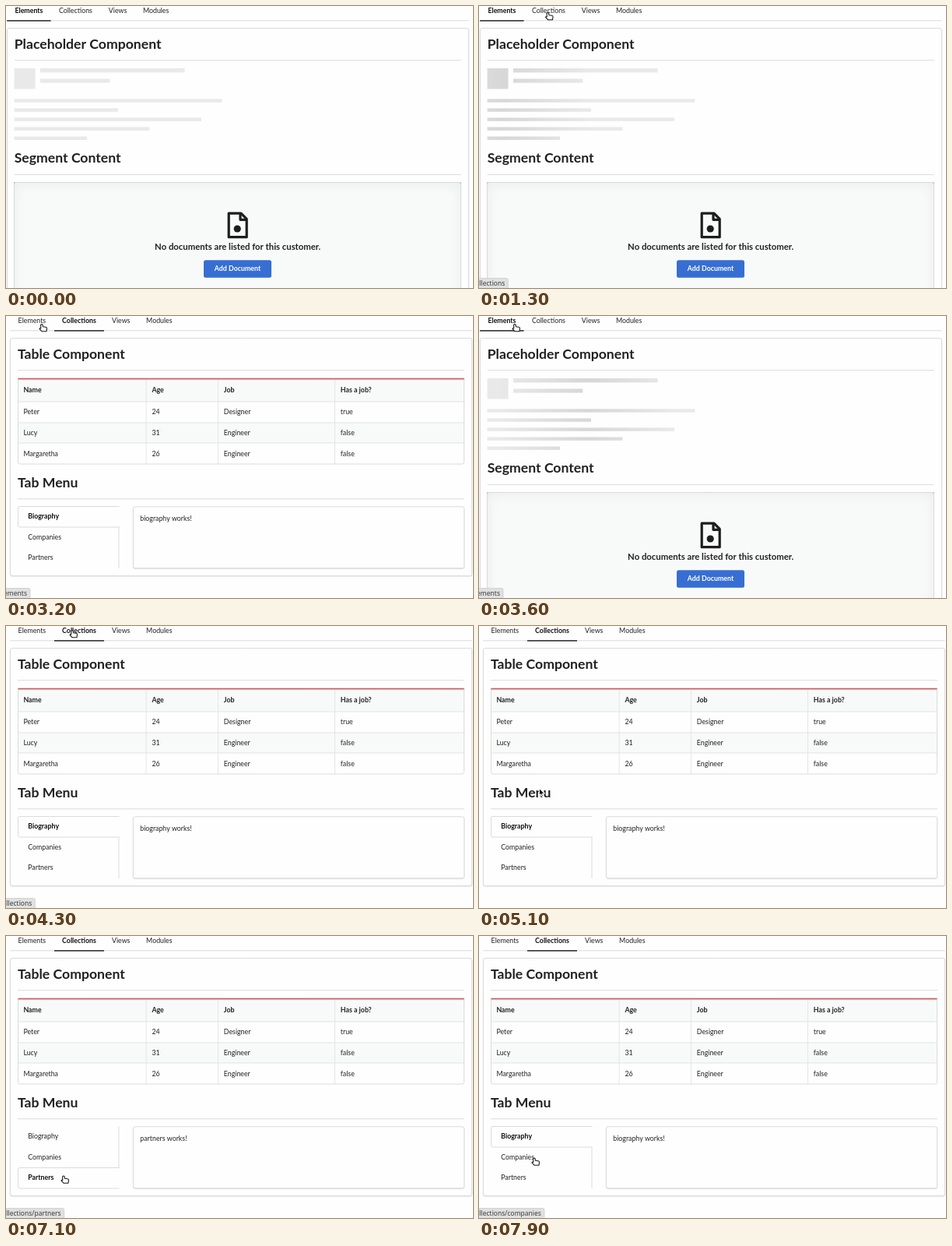
Animation of 600 by 362 pixels, one loop 8 s. Source, as an HTML page with a canvas:

```html
<!DOCTYPE html>
<html lang="en">
<head>
<meta charset="utf-8">
<title>Component gallery</title>
<style>
html, body { margin: 0; width: 100%; height: 100%; overflow: hidden; background: #fefefe; }
canvas { display: block; width: 600px; height: 362px; }
</style>
</head>
<body>
<canvas id="stage"></canvas>
<script>
const W = 600, H = 362, LOOP = 8000, STEP = 100;
const canvas = document.getElementById('stage');
const ctx = canvas.getContext('2d');
const dpr = window.devicePixelRatio || 1;
canvas.width = W * dpr;
canvas.height = H * dpr;

const PAPER = '#fefefe', INK = '#212121', LINE = '#dadbdb', SOFT = '#e4e5e5', PANEL = '#f8faf9';
const BODY = 8.82, TITLE = 17.64, HEADER = 11.34;

// [time, value]: the value holds until the next entry
const pages = [[0, 0], [2300, 1], [3500, 0], [4200, 1]];
const panes = [[0, 0], [5600, 1], [6900, 2], [7600, 0]];
const links = [
  [0, ''], [200, 'llections'], [3100, 'ements'], [3900, 'llections'], [4600, ''],
  [5400, 'llections/companies'], [6300, 'llections/partners'], [7200, 'llections/companies'],
  [7300, 'llections/biography'], [7800, 'llections/companies']
];
// [time, x, y] of the pointer tip
const track = [
  [200, 87, 7], [400, 88.5, 8.5], [2800, 88.5, 8.5], [3200, 46, 10.5], [3700, 46, 10.5],
  [4100, 85, 5.5], [4400, 85, 5.5], [4700, 88, 60], [5300, 72, 282], [5800, 76.5, 281],
  [6100, 76.5, 281], [6400, 74, 308], [7100, 74, 308], [7400, 70, 255], [7600, 70, 255],
  [7900, 71, 285]
];
const tabs = [['Elements', 10.3], ['Collections', 66.8], ['Views', 130.7], ['Modules', 174.8]];
const tabLines = [[0, 56.5], [56.7, 64]];
const people = [['Peter', '24', 'Designer', 'true'], ['Lucy', '31', 'Engineer', 'false'], ['Margaretha', '26', 'Engineer', 'false']];
const columns = [15, 180, 272.4, 422.4];

function at(list, t) {
  let value = list[0][1];
  for (const [start, v] of list) if (t >= start) value = v;
  return value;
}

function pointerAt(t) {
  if (t < track[0][0]) return null;
  for (let i = 1; i < track.length; i++) {
    const [t0, x0, y0] = track[i - 1], [t1, x1, y1] = track[i];
    if (t <= t1) {
      const k = (t - t0) / (t1 - t0);
      return [x0 + (x1 - x0) * k, y0 + (y1 - y0) * k];
    }
  }
  return track[track.length - 1].slice(1);
}

function text(s, x, y, size = BODY, bold = false, color = INK, align = 'left', family = 'Lato') {
  ctx.font = `${bold ? 700 : 400} ${size}px ${family}, sans-serif`;
  ctx.fillStyle = color;
  ctx.textAlign = align;
  ctx.fillText(s, x, y);
}

function rect(x, y, w, h, color) {
  ctx.fillStyle = color;
  ctx.fillRect(x, y, w, h);
}

function box(x, y, w, h, fill, stroke, r = 2.5) {
  ctx.beginPath();
  ctx.roundRect(x, y, w, h, r);
  if (fill) { ctx.fillStyle = fill; ctx.fill(); }
  if (stroke) { ctx.strokeStyle = stroke; ctx.lineWidth = 1; ctx.stroke(); }
}

function card(x, y, w, h) {
  ctx.save();
  ctx.shadowColor = 'rgba(34,36,38,.22)';
  ctx.shadowBlur = 1.5 * dpr;
  ctx.shadowOffsetY = 0.7 * dpr;
  box(x, y, w, h, PAPER);
  ctx.restore();
  box(x, y, w, h, null, LINE);
}

function title(s, x, y) {
  text(s, x + 9.6, y, TITLE, true);
  rect(x + 9.6, y + 14.5, 574, 1, LINE);
}

function drawMenu(x, active) {
  rect(x, 18.3, 593.5, 1, LINE);
  tabs.forEach(([name, dx], i) => text(name, x + dx, 9.2, BODY, i === active, i === active ? '#111' : INK));
  const [from, width] = tabLines[active];
  rect(x + from, 18.2, width, 1.4, '#1b1c1d');
}

function shimmer(left, t) {
  const period = 756, band = 227;
  const start = t >= 3500 ? 3580 : 424;
  const cycle = (((t - start) % 1000) + 1000) % 1000;
  let x = cycle * period / 1000;
  if (x > 300) x -= period;
  const g = ctx.createLinearGradient(left + x, 0, left + x + band, 0);
  g.addColorStop(0, '#e9e9e9');
  g.addColorStop(0.5, '#d7d7d7');
  g.addColorStop(1, '#e9e9e9');
  return g;
}

function drawFileIcon() {
  ctx.strokeStyle = ctx.fillStyle = '#1c1d1d';
  ctx.lineWidth = 3.2;
  ctx.lineJoin = 'round';
  ctx.beginPath();
  ctx.moveTo(287.6, 266.1);
  ctx.lineTo(302, 266.1);
  ctx.lineTo(309.2, 273.3);
  ctx.lineTo(309.2, 296.7);
  ctx.lineTo(286.2, 296.7);
  ctx.lineTo(286.2, 266.1);
  ctx.closePath();
  ctx.stroke();
  ctx.beginPath();
  ctx.moveTo(301, 266.5);
  ctx.lineTo(301, 274.3);
  ctx.lineTo(308.8, 274.3);
  ctx.stroke();
  ctx.beginPath();
  ctx.arc(297.2, 286, 4.6, 0, Math.PI * 2);
  ctx.fill();
}

function drawInsetShade(x, y, w, h) {
  ctx.save();
  ctx.beginPath();
  ctx.rect(x, y, w, h);
  ctx.clip();
  ctx.shadowColor = 'rgba(34,36,38,.07)';
  ctx.shadowBlur = 16 * dpr;
  ctx.shadowOffsetY = 1.3 * dpr;
  ctx.fillStyle = '#000';
  ctx.beginPath();
  ctx.rect(x - 60, y - 60, w + 120, h + 120);
  ctx.rect(x, y, w, h);
  ctx.fill('evenodd');
  ctx.restore();
}

function drawElements(t) {
  const x = 1.1;
  drawMenu(x, 0);
  card(x + 0.4, 28.5, 593, 400);
  title('Placeholder Component', x, 54.7);

  const left = 10.6, fill = shimmer(left, t);
  rect(left, 80, 27, 26.5, fill);
  rect(44, 80, 185.6, 5.4, fill);
  rect(44, 93.4, 89.4, 5.2, fill);
  [277.4, 144, 251, 184.4, 104].forEach((right, i) => rect(left, 119.3 + i * 12.05, right - left, 4.4, fill));

  title('Segment Content', x, 201.4);
  box(10.5, 226.5, 574, 200, PANEL);
  drawInsetShade(10.5, 226.5, 574, 200);
  box(10.5, 226.5, 574, 200, null, LINE);
  drawFileIcon();
  text('No documents are listed for this customer.', 297.7, 312.8, HEADER, true, INK, 'center');
  box(254, 326.2, 87, 22.6, '#376ed2');
  text('Add Document', 297.5, 340.2, BODY, true, '#fff', 'center');
}

function drawTable() {
  const right = 589, top = 80, rowTop = 110, rowH = 26.6;
  box(15.5, 80.5, 573, 109.5, PAPER);
  rect(15.5, 82, 573, rowTop - 82, PANEL);
  rect(15.5, rowTop + rowH, 573, rowH, PANEL);
  for (let i = 0; i < 3; i++) rect(15, Math.round(rowTop + rowH * i) - 0.5, 574, 1, SOFT);
  columns.slice(1).forEach(x => rect(x - 0.4, 82, 1, 108, SOFT));
  box(15.5, 80.5, 573, 109.5, null, LINE);
  box(15, top - 0.2, right - 15, 2, '#d9242b', [2, 2, 0, 0]);
  ['Name', 'Age', 'Job', 'Has a job?'].forEach((s, i) => text(s, columns[i] + 7.4, 98.4, BODY, true));
  people.forEach((row, r) => row.forEach((s, i) => text(s, columns[i] + 7.4, 126.3 + r * rowH, BODY)));
}

function drawTabs(active) {
  const top = 244.5, itemH = 26.5;
  rect(144.5, top, 1, itemH * 3, LINE);
  const y = top + active * itemH;
  rect(144, y, 2, itemH, PAPER);
  ctx.strokeStyle = LINE;
  ctx.lineWidth = 1;
  ctx.beginPath();
  ctx.moveTo(145.5, y);
  ctx.lineTo(18, y);
  ctx.quadraticCurveTo(15.5, y, 15.5, y + 2.5);
  ctx.lineTo(15.5, y + itemH - 2.5);
  ctx.quadraticCurveTo(15.5, y + itemH, 18, y + itemH);
  ctx.lineTo(145.5, y + itemH);
  ctx.stroke();
  const names = ['Biography', 'Companies', 'Partners'];
  names.forEach((s, i) => text(s, 28.2, 260.4 + i * itemH, BODY, i === active, i === active ? '#111' : INK));
  card(163.5, top + 0.3, 425.2, 79);
  text(names[active].toLowerCase() + ' works!', 172.3, 262.5);
}

function drawCollections(t) {
  const x = 5.3;
  drawMenu(x, 1);
  card(x + 0.3, 28.5, 593, 305);
  title('Table Component', x, 54.7);
  drawTable();
  title('Tab Menu', x, 219.8);
  drawTabs(at(panes, t));
}

function drawStatus(s) {
  if (!s) return;
  const size = 8.5;
  ctx.font = `400 ${size}px "Noto Sans", sans-serif`;
  const end = s === 'ements' ? 27 : ctx.measureText(s).width + 0.3;
  box(-4, 349.5, end + 8, 16, '#dfe0df', '#d2d3d2', 2);
  text(s, end, 359, size, false, '#3a3d3d', 'right', '"Noto Sans"');
}

function drawPointer(x, y, hand) {
  ctx.save();
  ctx.translate(x, y);
  ctx.beginPath();
  if (hand) {
    ctx.moveTo(-1.4, 0.8);
    ctx.quadraticCurveTo(0, -0.8, 1.2, 0.8);
    ctx.lineTo(1.4, 3.3);
    ctx.lineTo(5.2, 3.8);
    ctx.quadraticCurveTo(6.6, 4.1, 6.5, 5.4);
    ctx.lineTo(6, 9.2);
    ctx.lineTo(0, 9.2);
    ctx.lineTo(-2.9, 6.2);
    ctx.quadraticCurveTo(-3, 4.7, -1.2, 5.4);
  } else {
    [[0, 0], [0, 10], [2.3, 7.9], [3.9, 11], [5.4, 10.3], [4, 7.3], [7, 7]].forEach(p => ctx.lineTo(...p));
  }
  ctx.closePath();
  ctx.lineJoin = 'round';
  ctx.lineWidth = 1.1;
  ctx.fillStyle = hand ? '#fff' : '#111';
  ctx.strokeStyle = hand ? '#161616' : '#fff';
  ctx.fill();
  ctx.stroke();
  ctx.restore();
}

function draw(now) {
  const t = Math.floor((now % LOOP) / STEP) * STEP;
  ctx.setTransform(dpr, 0, 0, dpr, 0, 0);
  rect(0, 0, W, H, PAPER);
  if (at(pages, t)) drawCollections(t);
  else drawElements(t);
  drawStatus(at(links, t));
  const tip = pointerAt(t);
  if (tip) drawPointer(tip[0], tip[1], tip[1] < 19 || tip[1] > 244);
}

let begin = null;
function tick(now) {
  if (begin === null) begin = now;
  draw(now - begin);
  requestAnimationFrame(tick);
}
draw(0);
requestAnimationFrame(tick);
</script>
</body>
</html>
```
